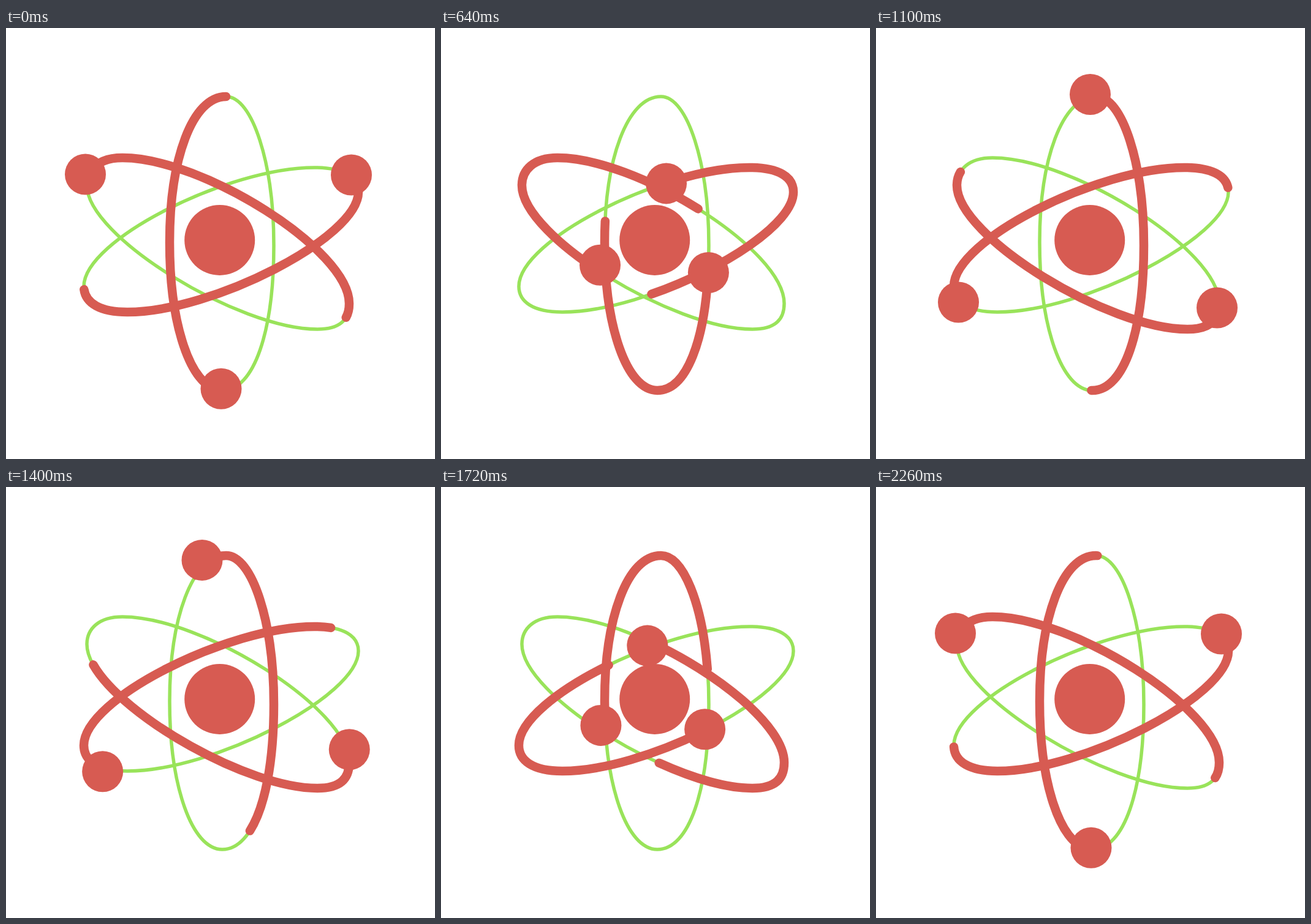
An HTML page for the animation above (2.28 s loop, 700x704 px).

```html
<!DOCTYPE html>
<html lang="en">
<head>
<meta charset="utf-8">
<title>Atom</title>
<style>
  html, body { margin: 0; width: 100%; height: 100%; overflow: hidden; background: #fff; }
  svg { display: block; width: 700px; height: 704px; }
  .orbit { fill: none; stroke: #99e35a; stroke-width: 5.5; }
  .trail { fill: none; stroke: #d75b52; stroke-width: 14.5; stroke-linecap: round; }
  .ball { fill: #d75b52; }
</style>
</head>
<body>
<svg id="stage" viewBox="0 0 700 704"></svg>
<script>
const LOOP = 2280;

// half laps as [start, end, x1, x2] of an ease with flat ends
const tallSteps = [[0, 1100, .845, .458], [1100, 2260, .75, .291]];
const wideSteps = [[0, 1100, .869, .444], [1100, 2260, .777, .26]];
const tailSteps = [[0, 1000, .865, .57], [1000, 2260, .682, .404]];

// orbit: closed ring; shift: where the trail's tail starts along it; there/back: the electron's two half laps
const atoms = [
  {
    orbit: 'M359 112C304 112 267 214 267 350C267 488 303 592 353 592C405 592 437 495 437 355C437 221 402 112 359 112Z',
    shift: 0,
    there: 'M351 589.3C468 589.3 466.5 108.5 349.5 108.5',
    back: 'M349.5 108.5C229 108.5 230 589.3 351 589.3',
    steps: tallSteps
  },
  {
    orbit: 'M560 450C560 362 320 212 190 212C151 212 132 232 132 257C132 341 380 492 508 492C547 492 560 475 560 450Z',
    shift: -24,
    there: 'M129.5 239C88 325 506 550 556.5 457',
    back: 'M556.5 457C614 365 167 146 129.5 239',
    steps: wideSteps
  },
  {
    orbit: 'M127 422C127 447 150 464 198 464C337 464 575 342 575 268C575 243 551 228 503 228C363 228 127 346 127 422Z',
    shift: 5,
    there: 'M563.5 240C512 162 107 340 134.5 448',
    back: 'M134.5 448C180 530 620 352 563.5 240',
    steps: wideSteps
  }
];

const stage = document.getElementById('stage');

function make(tag, attrs) {
  const el = document.createElementNS('http://www.w3.org/2000/svg', tag);
  for (const key in attrs) el.setAttribute(key, attrs[key]);
  return el;
}

const add = (tag, attrs) => stage.appendChild(make(tag, attrs));

function ease(x, x1, x2) {
  let lo = 0, hi = 1;
  for (let i = 0; i < 30; i++) {
    const s = (lo + hi) / 2, r = 1 - s;
    if (3 * s * r * r * x1 + 3 * s * s * r * x2 + s * s * s < x) lo = s; else hi = s;
  }
  return lo * lo * (3 - 2 * lo);
}

// half laps done at time t, 0 to 2
function laps(t, steps) {
  return steps.reduce((sum, [start, end, x1, x2]) => {
    const x = Math.min(1, Math.max(0, (t - start) / (end - start)));
    return sum + (x < 1 ? ease(x, x1, x2) : 1);
  }, 0);
}

function lane(d) {
  const path = make('path', { d });
  const length = path.getTotalLength();
  return p => path.getPointAtLength(p * length);
}

for (const a of atoms) add('path', { class: 'orbit', d: a.orbit });
for (const a of atoms) {
  a.trail = add('path', { class: 'trail', d: a.orbit });
  a.half = a.trail.getTotalLength() / 2;
  a.trail.setAttribute('stroke-dasharray', a.half + ' ' + a.half);
  a.lanes = [lane(a.there), lane(a.back)];
}
add('circle', { class: 'ball', cx: 348.7, cy: 346.5, r: 57.5 });
for (const a of atoms) a.ball = add('circle', { class: 'ball', r: 33.5 });

function draw(now) {
  const t = now % LOOP;
  const tail = Math.min(laps(t, tailSteps), 1.995);
  for (const a of atoms) {
    a.trail.setAttribute('stroke-dashoffset', -a.shift - tail * a.half);
    const lap = laps(t, a.steps);
    const at = lap < 1 ? a.lanes[0](lap) : a.lanes[1](lap - 1);
    a.ball.setAttribute('cx', at.x);
    a.ball.setAttribute('cy', at.y);
  }
}

function tick(now) {
  draw(now);
  requestAnimationFrame(tick);
}

draw(0);
requestAnimationFrame(tick);
</script>
</body>
</html>
```
